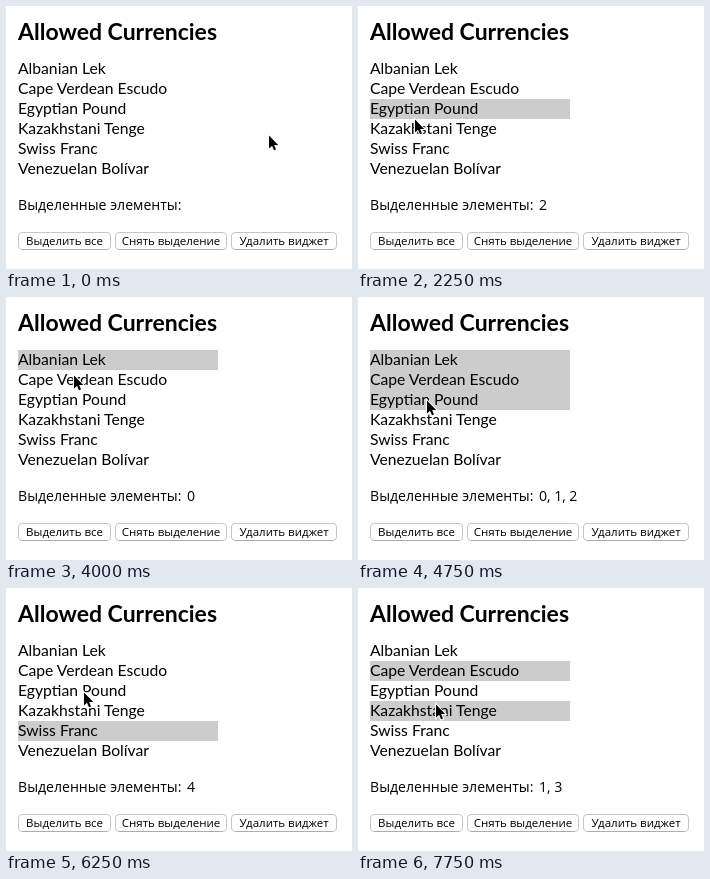
Recreate the animation shown at these times as an HTML page. Size 346 by 263 pixels, loop 8 s.

```html
<!DOCTYPE html>
<html lang="ru">
<head>
<meta charset="utf-8">
<title>Allowed Currencies</title>
<style>
  html, body { margin: 0; width: 100%; height: 100%; overflow: hidden; background: #fff; }
  svg { display: block; width: 346px; height: 263px; }
  text { fill: #000; white-space: pre; font-variant-ligatures: none; }
  .title { font: 700 23px Lato, sans-serif; }
  .item { font: 15.7px Lato, sans-serif; }
  .result { font: 500 14.1px "Open Sans", sans-serif; }
  .label { font: 500 11.5px "Open Sans", sans-serif; text-anchor: middle; }
  .button { fill: #fff; stroke: #c6c6c6; }
  .edge { stroke: #acacac; }
  .mark { fill: #ccc; }
</style>
</head>
<body>
<svg viewBox="0 0 346 263">
  <g id="marks"></g>
  <text class="title" x="12" y="34">Allowed Currencies</text>
  <g id="items"></g>
  <text class="result" x="12" y="204">Выделенные элементы:</text>
  <text class="result" id="values" x="181" y="204"></text>
  <g id="buttons"></g>
  <path id="cursor" d="M1 1.5V14.5L4 11.7L6 16.3L8 15.4L6.1 11H10.2Z"
        fill="#000" stroke="#fff" stroke-width="2" paint-order="stroke"/>
</svg>
<script>
const STEP = 250, LOOP = 8000, ROW = 20;
const items = ['Albanian Lek', 'Cape Verdean Escudo', 'Egyptian Pound',
               'Kazakhstani Tenge', 'Swiss Franc', 'Venezuelan Bolívar'];
const buttons = [[93, 'Выделить все'], [112, 'Снять выделение'], [106, 'Удалить виджет']];

// Turning points of the pointer: step, x, y
const turns = [
  [0, 262, 128], [5, 45, 46], [6, 46, 66], [11, 63, 142], [15, 67, 68], [19, 68, 102],
  [20, 68, 102], [22, 66, 153], [26, 80, 86], [28, 86, 122], [30, 77, 82], [31, 77, 115]
];

// Clicks: step, row, held key
const clicks = [
  [6, 0], [8, 2], [11, 4], [16, 0], [19, 2, 'shift'],
  [23, 4], [26, 1, 'shift'], [30, 1], [31, 3, 'ctrl']
];

const $ = id => document.getElementById(id);

function add(parent, tag, attrs, text = '') {
  const el = document.createElementNS('http://www.w3.org/2000/svg', tag);
  for (const key in attrs) el.setAttribute(key, attrs[key]);
  el.textContent = text;
  return parent.appendChild(el);
}

function pointerAt(step) {
  const i = Math.max(1, turns.findIndex(t => t[0] >= step));
  const [s0, x0, y0] = turns[i - 1], [s1, x1, y1] = turns[i];
  const k = (step - s0) / (s1 - s0);
  return [x0 + (x1 - x0) * k, y0 + (y1 - y0) * k].map(Math.round);
}

function selectionAt(step) {
  let picked = new Set(), anchor = 0;
  for (const [at, row, key] of clicks) {
    if (at > step) break;
    if (key === 'shift') {
      for (let r = Math.min(row, anchor); r <= Math.max(row, anchor); r++) picked.add(r);
    } else {
      if (key !== 'ctrl') picked = new Set();
      picked.add(row);
      anchor = row;
    }
  }
  return [...picked].sort();
}

const marks = items.map((name, i) => {
  add($('items'), 'text', { class: 'item', x: 12, y: 68 + ROW * i }, name);
  return add($('marks'), 'rect', { class: 'mark', x: 12, y: 53 + ROW * i, width: 200, height: ROW });
});

let left = 12;
for (const [w, name] of buttons) {
  add($('buttons'), 'rect', { class: 'button', x: left + .5, y: 226.5, width: w - 1, height: 17, rx: 3.5 });
  add($('buttons'), 'path', { class: 'edge', d: `M${left + 4} 243.5h${w - 8}` });
  add($('buttons'), 'text', { class: 'label', x: left + w / 2, y: 239 }, name);
  left += w + 4;
}

let last = -1;

function draw(time) {
  const step = Math.floor(time % LOOP / STEP);
  if (step === last) return;
  last = step;
  const rows = selectionAt(step);
  marks.forEach((m, i) => m.setAttribute('visibility', rows.includes(i) ? 'visible' : 'hidden'));
  $('values').textContent = rows.join(', ');
  $('cursor').setAttribute('transform', `translate(${pointerAt(step)})`);
}

const start = performance.now();
function tick() {
  draw(performance.now() - start);
  requestAnimationFrame(tick);
}
tick();
</script>
</body>
</html>
```
